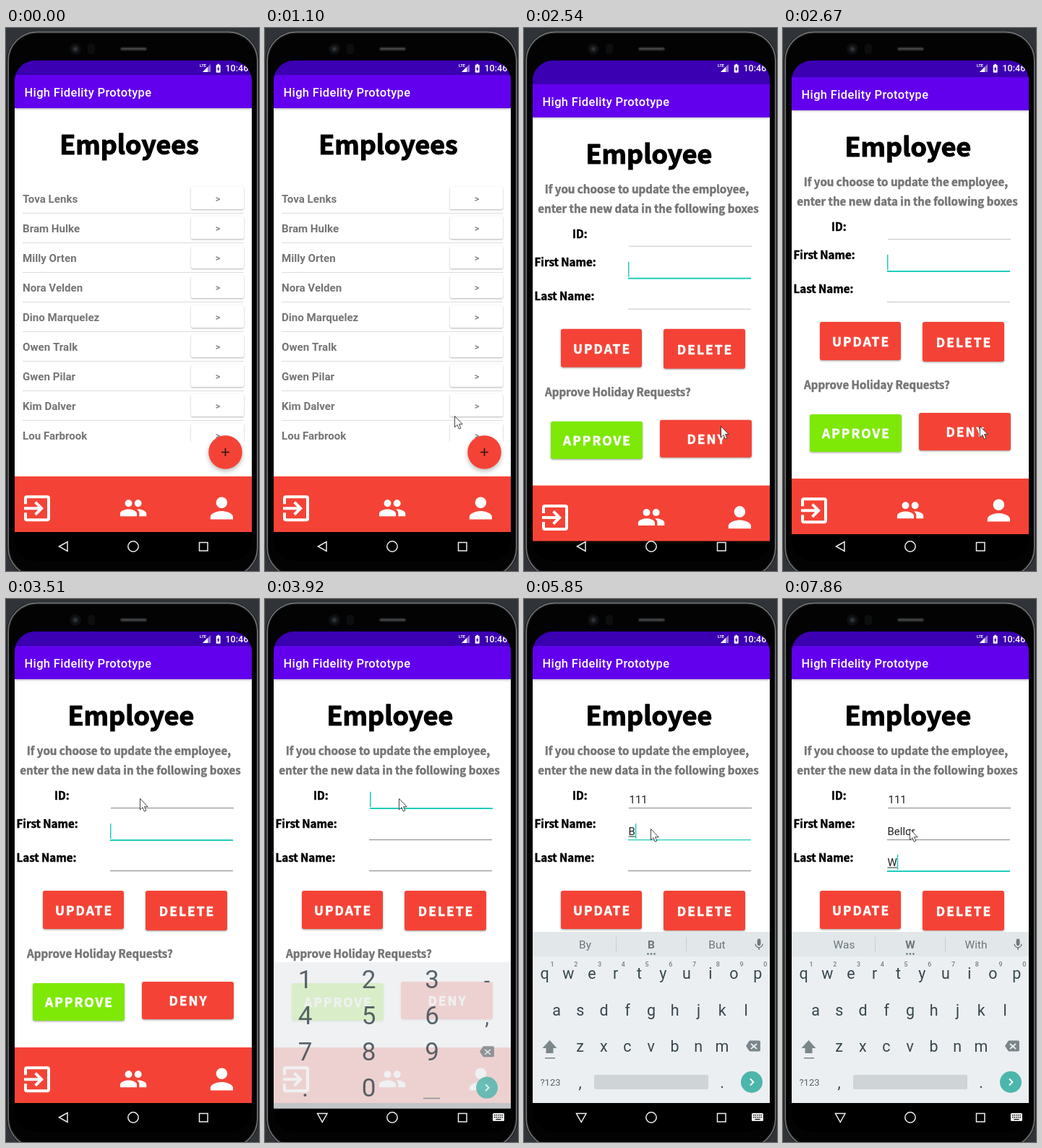
An HTML page with a canvas for the animation above (7990 ms loop, 350 by 752 pixels).

```html
<!DOCTYPE html>
<html lang="en">
<head>
<meta charset="utf-8">
<style>
html, body { margin: 0; width: 100%; height: 100%; overflow: hidden; background: #303337; }
canvas { display: block; width: 350px; height: 752px; }
</style>
</head>
<body>
<canvas></canvas>
<script>
const LOOP = 7990;
const RED = '#f44336', TEAL = '#1ecdbc', KEY = '#37474f', GREY = '#757575', KEY_GREY = '#7b868b';
const SANS = '"Noto Sans CJK JP", "Noto Sans CJK SC", "Noto Sans CJK", "Noto Sans", sans-serif';
const ROBOTO = 'Roboto, sans-serif';

const canvas = document.querySelector('canvas');
const dpr = window.devicePixelRatio || 1;
canvas.width = 350 * dpr;
canvas.height = 752 * dpr;
const ctx = canvas.getContext('2d');

const names = ['Tova Lenks', 'Bram Hulke', 'Milly Orten', 'Nora Velden', 'Dino Marquelez',
  'Owen Tralk', 'Gwen Pilar', 'Kim Dalver', 'Lou Farbrook'];

// [time, text] and [time, suggestions]; the last entry already reached applies
const idTyping = [[0, ''], [4270, '1'], [4410, '11'], [4550, '111']];
const firstTyping = [[0, ''], [5510, 'B'], [6050, 'Be'], [6250, 'Bel'], [6400, 'Bell'], [6600, 'Bello'], [6930, 'Bellor']];
const lastTyping = [[0, ''], [7810, 'W']];
const suggestions = [[0, null], [5580, ['By', 'B', 'But']], [6050, ['Been', 'Be', 'Being']],
  [6250, ['Bell', 'Bel', 'Belt']], [6400, ['Bells', 'Bell', 'Belly']], [6600, ['Below', 'Bello', 'Bellow']],
  [7000, ['Bellow', 'Bellor', 'Bellows']], [7330, null], [7860, ['Was', 'W', 'With']]];
const focusSteps = [[0, 'first'], [3590, 'id'], [4970, 'first'], [7330, 'last']];

// [time, x, y] of the pointer tip
const pointerPath = [[330, 313, 722], [540, 252, 621], [750, 194, 572], [950, 225, 525], [1100, 262, 537],
  [1990, 262, 537], [2130, 257, 541], [2340, 272, 551], [2740, 272, 551], [3310, 190, 290], [3500, 185, 276],
  [4620, 185, 276], [4900, 175, 318]];

const icons = {
  exit: 'M10.09 15.59L11.5 17l5-5-5-5-1.41 1.41L12.67 11H3v2h9.67zM19 3H5a2 2 0 0 0-2 2v4h2V5h14v14H5v-4H3v4a2 2 0 0 0 2 2h14a2 2 0 0 0 2-2V5a2 2 0 0 0-2-2z',
  people: 'M16 11a3 3 0 1 0 0-6 3 3 0 0 0 0 6zM8 11a3 3 0 1 0 0-6 3 3 0 0 0 0 6zM8 13c-2.33 0-7 1.17-7 3.5V19h14v-2.5C15 14.17 10.33 13 8 13zM16 13l-.97.05c1.16.84 1.97 1.97 1.97 3.45V19h6v-2.5c0-2.33-4.67-3.5-7-3.5z',
  person: 'M12 12a4 4 0 1 0 0-8 4 4 0 0 0 0 8zM12 14c-2.67 0-8 1.34-8 4v2h16v-2c0-2.66-5.33-4-8-4z',
  backspace: 'M22 3H7c-.7 0-1.2.35-1.6.9L0 12l5.4 8.1c.4.5.9.9 1.6.9h15a2 2 0 0 0 2-2V5a2 2 0 0 0-2-2z',
  mic: 'M12 14a3 3 0 0 0 3-3V5a3 3 0 0 0-6 0v6a3 3 0 0 0 3 3zM17.3 11a5.3 5.3 0 0 1-10.6 0H5c0 3.4 2.7 6.2 6 6.7V21h2v-3.3c3.3-.5 6-3.3 6-6.7z',
  shift: 'M12 3L2 14h5v7h10v-7h5z',
  battery: 'M15.7 4H14V2h-4v2H8.3C7.6 4 7 4.6 7 5.3v15.4c0 .7.6 1.3 1.3 1.3h7.4c.7 0 1.3-.6 1.3-1.3V5.3c0-.7-.6-1.3-1.3-1.3zM11 20v-5.500H9L13 7v5.500h2z',
  pointer: 'M0 0V16.500L3.800 13 6.300 19 9 17.800 6.500 12H11.500z'
};

const clamp01 = v => Math.max(0, Math.min(1, v));
const easeOut = p => 1 - (1 - clamp01(p)) ** 3;
const current = (steps, t) => steps.filter(s => s[0] <= t).pop()[1];

function text(str, x, y, font, color, align = 'left', spacing = 0) {
  ctx.font = font;
  ctx.fillStyle = color;
  ctx.textAlign = align;
  ctx.letterSpacing = spacing + 'px';
  ctx.fillText(str, x + (align === 'center' ? spacing / 2 : 0), y);
}

// Bold text thickened with an outline, like Android's synthetic bold
function heavyText(str, x, y, size, color, align = 'left', spacing = 0) {
  text(str, x, y, `700 ${size}px ${SANS}`, color, align, spacing);
  ctx.strokeStyle = color;
  ctx.lineWidth = size / 30;
  ctx.lineJoin = 'round';
  ctx.strokeText(str, x + (align === 'center' ? spacing / 2 : 0), y);
  ctx.lineJoin = 'miter';
}

function rect(x, y, w, h, color, radius = 0) {
  ctx.fillStyle = color;
  ctx.beginPath();
  ctx.roundRect(x, y, w, h, radius);
  ctx.fill();
}

function circle(x, y, r, color) {
  ctx.fillStyle = color;
  ctx.beginPath();
  ctx.arc(x, y, r, 0, 7);
  ctx.fill();
}

function line(points, color, width, close) {
  ctx.strokeStyle = color;
  ctx.lineWidth = width;
  ctx.beginPath();
  points.forEach(p => ctx.lineTo(...p));
  if (close) ctx.closePath();
  ctx.stroke();
}

function icon(name, x, y, scale, color, outline) {
  const path = new Path2D(icons[name]);
  ctx.save();
  ctx.translate(x, y);
  ctx.scale(scale, scale);
  ctx.fillStyle = color;
  ctx.fill(path, 'evenodd');
  if (outline) {
    ctx.strokeStyle = outline;
    ctx.lineWidth = 0.9;
    ctx.stroke(path);
  }
  ctx.restore();
}

function shadowed(blur, dy, alpha, draw) {
  ctx.save();
  ctx.shadowColor = `rgba(0,0,0,${alpha})`;
  ctx.shadowBlur = blur * dpr;
  ctx.shadowOffsetY = dy * dpr;
  draw();
  ctx.restore();
}

function drawBody() {
  rect(0, 0, 350, 752, '#303337');
  rect(1, 4, 349, 757, '#101112', 42);
  ctx.strokeStyle = '#6c6e70';
  ctx.lineWidth = 1.8;
  ctx.beginPath();
  ctx.roundRect(3, 5.500, 345, 754, 40);
  ctx.stroke();
  rect(5, 8, 341, 749, '#030303', 38);
  circle(96, 29, 8, '#0d0e10');
  circle(96, 29, 4.500, '#1d2024');
  circle(96, 29, 2, '#33383d');
  rect(113, 22, 10, 14, '#0c0d0e', 4);
  rect(158, 26.500, 37, 5, '#292a2c', 2.500);
  rect(160, 28, 33, 1.500, '#4a4b4d', 1);
}

function drawWindow(content) {
  rect(12, 45, 328, 21, '#3b00b1');
  rect(12, 111, 328, 510, '#fff');
  content();
  shadowed(3, 1, 0.35, () => rect(12, 65, 328, 46, '#6200ee'));
  text('High Fidelity Prototype', 25.500, 95, `500 16.5px ${ROBOTO}`, '#fff', 'left', 0.35);
  rect(12, 621, 328, 77, RED);
  icon('exit', 19, 641.300, 2, '#fff');
  icon('people', 156.300, 645, 1.650, '#fff');
  icon('person', 275, 641.600, 1.950, '#fff');
  rect(12, 698, 328, 40, '#000');
}

function drawList(scroll) {
  heavyText('Employees', 170.500, 175, 35.8, '#000', 'center');
  ctx.save();
  ctx.beginPath();
  ctx.rect(12, 215, 328, 358);
  ctx.clip();
  names.forEach((name, i) => {
    const y = 215 + i * 41 - scroll;
    text(name, 23, y + 26.500, `700 15.1px ${ROBOTO}`, GREY);
    shadowed(2.500, 1, 0.3, () => rect(256, y + 5, 73, 31, '#fff', 2.500));
    text('>', 293, y + 26, `700 13px ${ROBOTO}`, '#8c8c8c', 'center');
    if (i < 8) rect(23, y + 41, 306, 1, '#dcdcdc');
  });
  ctx.restore();
  shadowed(6, 3, 0.27, () => circle(303.500, 587.500, 23.300, RED));
  line([[298, 587.500], [309, 587.500]], '#2b1514', 1.600);
  line([[303.500, 582], [303.500, 593]], '#2b1514', 1.600);
}

function button(label, x, y, w, h, color, textY) {
  shadowed(2.500, 1.300, 0.34, () => rect(x, y, w, h, color, 3));
  heavyText(label, x + w / 2, textY, 17.4, '#fff', 'center', 2);
}

function field(value, x, y, baseline, focused, composing, idleColor, weight) {
  rect(x, y, 170, focused ? weight : 1, focused ? TEAL : idleColor);
  text(value, x + 0.500, baseline, `15px ${ROBOTO}`, '#222');
  const width = ctx.measureText(value).width;
  if (composing && value) rect(x + 0.500, baseline + 1.500, width, 1, '#222');
  if (focused) rect(x + width + (value ? 0.500 : 0), baseline - 16, 1.500, 21, TEAL);
}

function drawForm(t) {
  const label = 15.1;
  const focus = current(focusSteps, t);
  const idle = t < 3310 ? '#c4c4c4' : '#858585';
  heavyText('Employee', 173, 175, 35.8, '#000', 'center');
  heavyText('If you choose to update the employee,', 170, 216, label, GREY, 'center');
  heavyText('enter the new data in the following boxes', 172, 243, label, GREY, 'center');
  heavyText('ID:', 67, 278, label, '#000');
  heavyText('First Name:', 14.500, 317, label, '#000');
  heavyText('Last Name:', 14.500, 364, label, '#000');
  field(current(idTyping, t), 145, 289, 283, focus === 'id', false, idle, 2);
  field(current(firstTyping, t), 144, 333, 327, focus === 'first', t < 7330, idle, t < 4000 ? 2 : 1.300);
  field(current(lastTyping, t), 144, 376, 370, focus === 'last', true, idle, 2);
  button('UPDATE', 51, 404, 112, 53, RED, 438);
  button('DELETE', 193, 404, 113, 55, RED, 439);
  heavyText('Approve Holiday Requests?', 29, 497, label, GREY);
  button('APPROVE', 37, 532, 127, 52, '#7ee807', 565);
  button('DENY', 188, 530, 127, 52, RED, 563);
}

function drawBackspace(x, y) {
  icon('backspace', x - 10, y - 10, 0.830, KEY_GREY);
  line([[x - 3, y - 3], [x + 5, y + 4]], '#eceff1', 1.700);
  line([[x + 5, y - 3], [x - 3, y + 4]], '#eceff1', 1.700);
}

function drawGoKey(x) {
  circle(x, 669, 15, '#4db6ac');
  line([[x - 2, 664.500], [x + 2.500, 669], [x - 2, 673.500]], '#fff', 1.800);
}

function drawNumberPad() {
  rect(12, 495, 328, 203, '#eceff1');
  ['123-', '456,', '789 ', '.0'].forEach((row, r) => [...row].forEach((key, c) =>
    text(key, [55.500, 143.500, 231, 307][c], 531.500 + r * 50, `${c < 3 ? 35 : 29}px ${ROBOTO}`, KEY, 'center')));
  rect(219, 683, 23, 1.500, KEY_GREY);
  drawBackspace(307, 619);
  drawGoKey(307);
}

function drawLetterKeys(words) {
  rect(12, 461, 328, 237, '#eceff1');
  rect(12, 461, 328, 34, '#e2e7e9');
  rect(127, 468, 1, 21, '#c9ced1');
  rect(224, 468, 1, 21, '#c9ced1');
  icon('mic', 315.500, 469, 0.800, '#6d787d');
  if (words) {
    words.forEach((word, i) =>
      text(word, [84.500, 176, 267][i], 484, `${i === 1 ? 700 : 400} 15.5px ${ROBOTO}`, '#6b777d', 'center'));
    [171.500, 176, 180.500].forEach(x => circle(x, 491.500, 1.200, '#59666b'));
  }
  const keys = (row, x, y) => [...row].forEach((key, i) =>
    text(key, x + i * 32.750, y, `21.5px ${ROBOTO}`, KEY, 'center'));
  keys('qwertyuiop', 28.500, 526);
  keys('asdfghjkl', 45, 577);
  keys('zxcvbnm', 77.500, 627);
  keys(',', 77.500, 677);
  keys('.', 274, 677);
  [...'1234567890'].forEach((digit, i) =>
    text(digit, 39 + i * 32.750, 508.500, `500 9px ${ROBOTO}`, '#748085', 'center'));
  icon('shift', 23.500, 608, 1, KEY_GREY);
  rect(29, 635, 14, 1.500, KEY_GREY);
  drawBackspace(317, 619);
  text('?123', 36.500, 674, `13px ${ROBOTO}`, '#56646a', 'center');
  rect(97, 659, 158, 20, '#cfd4d6', 2);
  drawGoKey(315);
}

function drawKeyboard(t) {
  if (t < 3780) return;
  const progress = clamp01((t - 3780) / 350);
  ctx.save();
  ctx.globalAlpha = Math.min(1, progress * 2.05);
  ctx.translate(0, 22 * (1 - progress) ** 2);
  if (t < 5110) drawNumberPad();
  else drawLetterKeys(current(suggestions, t));
  ctx.restore();
}

function drawSystemIcons(keyboardOpen) {
  text('LTE', 268, 54, `700 5.5px ${ROBOTO}`, '#fff');
  ctx.fillStyle = 'rgba(255,255,255,.45)';
  ctx.beginPath();
  ctx.moveTo(283, 50); ctx.lineTo(283, 61); ctx.lineTo(272, 61);
  ctx.fill();
  ctx.fillStyle = '#fff';
  ctx.beginPath();
  ctx.moveTo(279, 54); ctx.lineTo(279, 61); ctx.lineTo(272, 61);
  ctx.fill();
  icon('battery', 286.500, 48.500, 0.600, '#fff');
  text('10:46', 303.500, 60, `500 12.5px ${ROBOTO}`, '#fff');

  const back = keyboardOpen ? [[72.500, 712.500], [86, 712.500], [79.250, 724.500]] : [[73.500, 718], [85, 711.500], [85, 724.500]];
  line(back, '#eee', 1.500, true);
  ctx.beginPath();
  ctx.arc(176, 718, 7.200, 0, 7);
  ctx.stroke();
  ctx.strokeRect(267.500, 712.500, 11.500, 11.500);
  if (!keyboardOpen) return;
  rect(315, 712, 16, 11, '#eee', 1.500);
  for (let i = 0; i < 10; i++) rect(317 + i % 5 * 2.600, 714 + Math.floor(i / 5) * 3, 1.400, 1.400, '#111');
  rect(319.500, 720, 7, 1.300, '#111');
}

function drawPointer(t) {
  if (t < pointerPath[0][0]) return;
  const next = pointerPath.findIndex(p => p[0] > t);
  const [t1, x1, y1] = pointerPath.at(next < 0 ? -1 : next);
  const [t0, x0, y0] = next < 0 ? [0, x1, y1] : pointerPath[next - 1];
  const p = (t - t0) / (t1 - t0);
  const k = next < 0 ? 0 : p * p * (3 - 2 * p);
  icon('pointer', x0 + (x1 - x0) * k + 0.500, y0 + (y1 - y0) * k + 0.500, 0.930, '#fff', '#222');
}

function draw(t) {
  ctx.setTransform(dpr, 0, 0, dpr, 0, 0);
  drawBody();
  ctx.save();
  ctx.beginPath();
  ctx.roundRect(12, 45, 328, 693, 28);
  ctx.clip();
  if (t < 3400) drawWindow(() => drawList(11 * easeOut((t - 1170) / 700)));
  if (t >= 2540) {
    const rise = t < 3310 ? 28 * Math.exp((2470 - t) / 90) : 0;
    ctx.save();
    ctx.translate(0, rise);
    drawWindow(() => drawForm(t));
    ctx.restore();
  }
  drawKeyboard(t);
  drawSystemIcons(t >= 3780);
  ctx.restore();
  drawPointer(t);
}

const start = performance.now();
function frame() {
  draw((performance.now() - start) % LOOP);
  requestAnimationFrame(frame);
}
frame();
</script>
</body>
</html>
```
